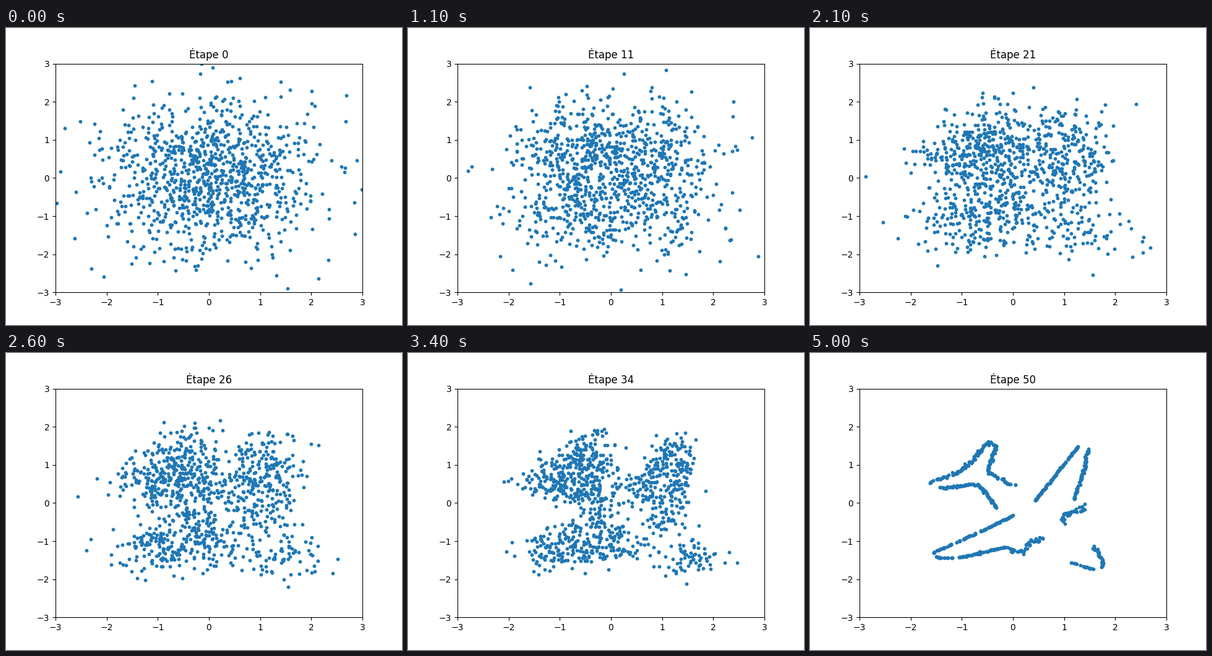
These frames come from a looping animation (640x480 px, 5100 ms). A matplotlib script:

```python
import numpy as np
import matplotlib.pyplot as plt
from matplotlib.animation import FuncAnimation

STEPS = 50
COUNT = 1000
GAP = 0.015        # spacing of the points along a stroke
BLUR = 0.015       # smallest blur when guessing the clean position

# Outline strokes: scatter width, then corner points
STROKES = [
    (.025, (-1.58, .55), (-1.1, .8), (-.75, 1.15), (-.5, 1.61), (-.34, 1.52),
     (-.49, .8), (0, .45)),
    (.02, (-1.4, .38), (-.7, .5), (-.3, -.12)),
    (.012, (.05, -.31), (-.7, -.78), (-1.56, -1.31)),
    (.015, (-1.5, -1.42), (-1.25, -1.44), (-.95, -1.4), (-.1, -1.14)),
    (.04, (-.06, -1.2), (.2, -1.3), (.3, -1.07), (.64, -.93)),
    (.01, (.41, .02), (1.29, 1.52)),
    (.015, (1.49, 1.45), (1.4, .9), (1.18, .1)),
    (.04, (1.36, -.12), (.95, -.36), (1.02, -.53)),
    (.02, (1.55, -1.1), (1.76, -1.5), (1.72, -1.72)),
    (.015, (1.12, -1.55), (1.58, -1.74)),
]

rng = np.random.default_rng(8)


def trace(width, *corners):
    """Evenly spaced points along a polyline, slightly scattered."""
    x, y = np.transpose(corners)
    s = np.r_[0, np.cumsum(np.hypot(np.diff(x), np.diff(y)))]
    u = np.arange(0, s[-1], GAP)
    line = np.column_stack([np.interp(u, s, x), np.interp(u, s, y)])
    return line + width * rng.normal(size=line.shape)


shape = np.vstack([trace(*stroke) for stroke in STROKES])
half_sq = 0.5 * (shape ** 2).sum(axis=1)


def clean_guess(x, keep):
    """Mean shape position behind noisy points, given the kept signal share."""
    spread = (1 - keep) / keep + BLUR ** 2
    z = (x / np.sqrt(keep) @ shape.T - half_sq) / spread
    w = np.exp(z - z.max(axis=1, keepdims=True))
    return w @ shape / w.sum(axis=1, keepdims=True)


def denoise():
    """Reverse diffusion from normal noise; returns every state."""
    beta = np.linspace(1e-4, 0.02, STEPS)
    keep = np.r_[1, np.cumprod(1 - beta)]
    x = rng.normal(size=(COUNT, 2))
    states = [x]
    for t in range(STEPS, 0, -1):
        b, now, after = beta[t - 1], keep[t], keep[t - 1]
        pull = b * np.sqrt(after) / (1 - now)
        stay = (1 - after) * np.sqrt(1 - b) / (1 - now)
        noise = np.sqrt(b * (1 - after) / (1 - now))
        x = (pull * clean_guess(x, now) + stay * x
             + noise * rng.normal(size=x.shape))
        states.append(x)
    return states


states = denoise()

fig, ax = plt.subplots(figsize=(6.4, 4.8), dpi=100)
dots = ax.scatter([], [], s=10, color="tab:blue")
ax.set_xlim(-3, 3)
ax.set_ylim(-3, 3)
title = ax.set_title("Étape 0")


def update(step):
    dots.set_offsets(states[step])
    title.set_text(f"Étape {step}")
    return dots, title


anim = FuncAnimation(fig, update, frames=STEPS + 1, interval=100,
                     repeat=True, repeat_delay=0, blit=False)
plt.show()
```
